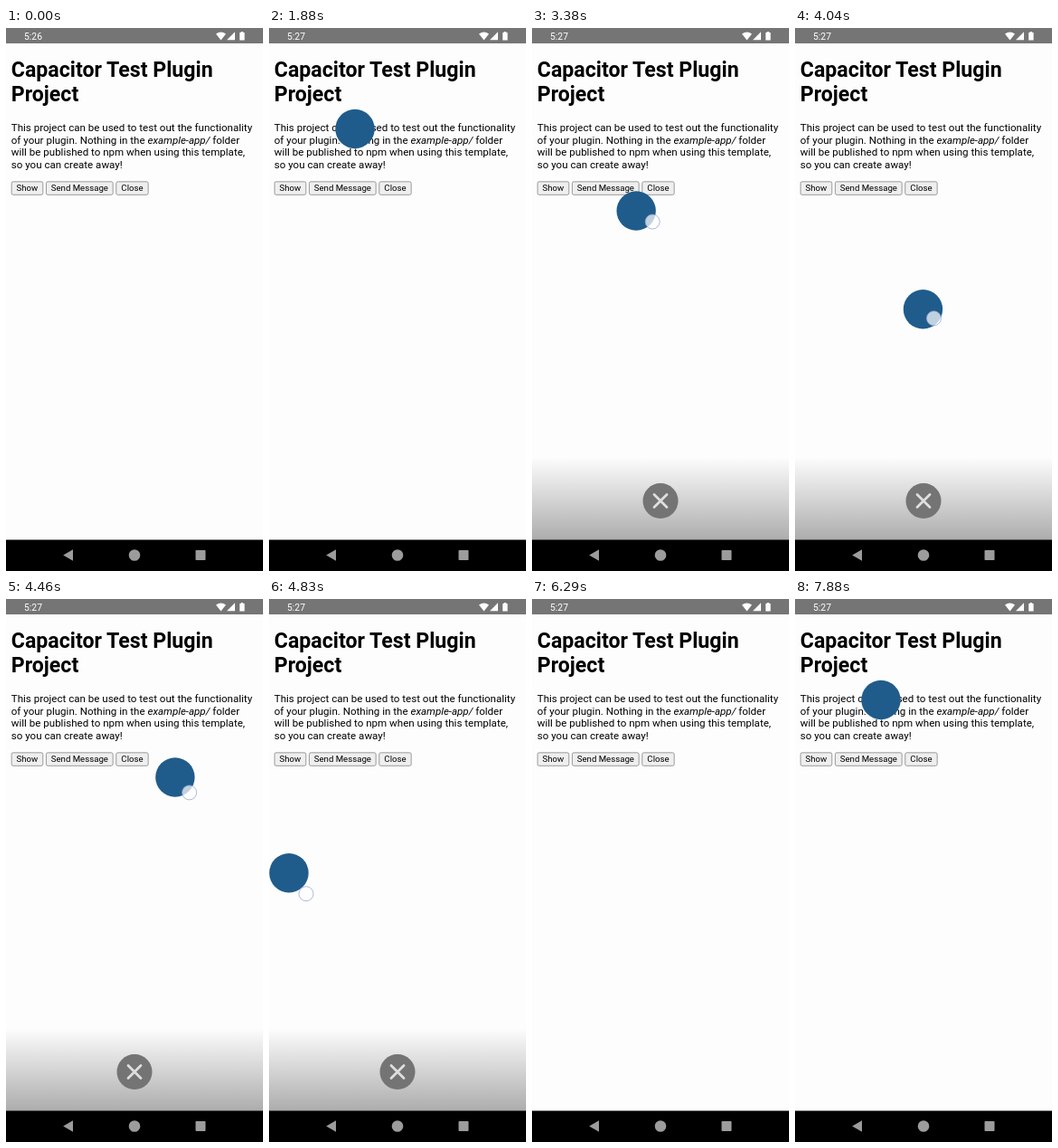
Write an HTML page that moves like this. It is 284 px wide and 600 px high and loops after 8000 ms.

```html
<!DOCTYPE html>
<html lang="en">
<head>
<meta charset="utf-8">
<title>Plugin demo</title>
<style>
html, body { margin: 0; width: 100%; height: 100%; overflow: hidden; background: #fdfdfd; }
#stage { position: relative; width: 284px; height: 600px; overflow: hidden; background: #fdfdfd; font-family: Roboto, sans-serif; }
#page {
  position: absolute; left: 0; top: 17px; width: 377px; padding: 0 8px;
  font-size: 16px; line-height: 19px; color: #000; white-space: nowrap;
  transform: scale(.7226); transform-origin: 0 0;
}
h1 { margin: 21.44px 0; font-size: 32px; line-height: 38px; font-weight: 700; }
p { margin: 0 0 16px; }
button {
  margin: 0; padding: 2px 7px; height: 21px; box-sizing: border-box;
  border: 1px solid #767676; border-radius: 3px; background: #efefef;
  font: 13.333px/15px Roboto, sans-serif; color: #000;
}
button.down { background: #f5f5f5; border-color: #8d8d8d; }
svg { position: absolute; left: 0; top: 0; }
svg text { font: 10.4px Roboto, sans-serif; fill: #fff; }
</style>
</head>
<body>
<div id="stage">
  <div id="page">
    <h1>Capacitor Test Plugin<br>Project</h1>
    <p>This project can be used to test out the functionality<br>of your plugin. Nothing in the <em>example-app/</em> folder<br>will be published to npm when using this template,<br>so you can create away!</p>
    <button id="show">Show</button> <button>Send Message</button> <button>Close</button>
  </div>
  <svg width="284" height="600" viewBox="0 0 284 600">
    <defs>
      <linearGradient id="fade" x1="0" y1="0" x2="0" y2="1">
        <stop offset="0" stop-color="#000" stop-opacity="0"/>
        <stop offset="1" stop-color="#000" stop-opacity=".32"/>
      </linearGradient>
    </defs>
    <rect id="shade" y="474" width="284" height="92" fill="url(#fade)"/>
    <g id="target">
      <circle r="19.5" fill="#747474"/>
      <path d="M-7-7L7 7M7-7L-7 7" stroke="#dedede" stroke-width="2.8" stroke-linecap="round"/>
    </g>
    <circle id="bubble" r="21.7" fill="#1f5c8b"/>
    <circle id="touch" r="8" fill="#fff" fill-opacity=".72" stroke="#8fa3cf" stroke-opacity=".75"/>

    <rect width="284" height="17" fill="#757575"/>
    <text id="clock" x="20" y="13.2">5:26</text>
    <g fill="#fff">
      <path d="M232 6.6Q237.5 2.6 243 6.6L237.5 13.4Z"/>
      <path d="M244 13.2L253 4.2V13.2Z"/>
      <path d="M258.2 5h1.5v-1h2.4v1h1.5v8.6h-5.4z"/>
    </g>
    <rect y="565.5" width="284" height="34.5"/>
    <g fill="#9c9c9c">
      <path d="M63.2 582.5L74 576.2V588.8Z"/>
      <circle cx="142" cy="582.5" r="6.3"/>
      <rect x="209.5" y="577" width="11" height="11" rx=".8"/>
    </g>
  </svg>
</div>
<script>
const LOOP = 8000, HOME = [95, 111.5], BIN = [142, 522.5];
const GRAB = 2830, DROP = 6090;

// time, x, y of the bubble while dragged
const path = [
  [2830, ...HOME], [2980, ...HOME], [3180, 105, 150], [3380, 115, 202],
  [3560, 160, 172], [3700, 222, 155], [3820, 245, 230], [3940, 196, 332],
  [4040, 142, 311], [4180, 62, 285], [4260, 44, 225], [4350, 85, 150],
  [4440, 170, 185], [4520, 219, 240], [4610, 190, 330], [4710, 95, 368],
  [4830, 22, 303], [4920, 22, 303], [5050, 60, 235], [5180, 125, 212],
  [5300, 190, 225], [5400, 205, 180], [5490, 150, 132], [5600, 65, 160],
  [5710, 38, 260], [5830, 88, 400], [5950, ...BIN], [6090, ...BIN]
];
// time, finger offset from the bubble centre
const finger = [
  [2830, 10, 9], [3380, 18, 12], [4040, 12, 10], [4830, 19, 23],
  [4920, 19, 23], [5300, 13, 11], [6130, 8, 25]
];

const el = id => document.getElementById(id);
const clamp = (v, a, b) => Math.min(b, Math.max(a, v));
const ramp = (t, a, b) => clamp((t - a) / (b - a), 0, 1);
const easeOut = u => 1 - (1 - u) ** 3;

function segment(keys, t) {
  let i = 0;
  while (i < keys.length - 2 && t >= keys[i + 1][0]) i++;
  return i;
}

function linear(keys, t) {
  const i = segment(keys, t), a = keys[i], b = keys[i + 1], u = ramp(t, a[0], b[0]);
  return [1, 2].map(k => a[k] + (b[k] - a[k]) * u);
}

// Hermite curve through timed points
function smooth(keys, t) {
  const i = segment(keys, t), a = keys[i], b = keys[i + 1];
  const prev = keys[i - 1] || a, next = keys[i + 2] || b;
  const d = b[0] - a[0], u = ramp(t, a[0], b[0]), v = 1 - u;
  return [1, 2].map(k => {
    const m = (b[k] - prev[k]) / (b[0] - prev[0]) * d;
    const n = (next[k] - a[k]) / (next[0] - a[0]) * d;
    return a[k] * (1 + 2 * u) * v * v + m * u * v * v + b[k] * u * u * (3 - 2 * u) - n * u * u * v;
  });
}

function place(id, [x, y], scale, alpha) {
  el(id).setAttribute("transform", `translate(${x} ${y}) scale(${scale})`);
  el(id).setAttribute("opacity", alpha);
}

function draw(t) {
  el("clock").textContent = t < 290 ? "5:26" : "5:27";

  const second = t >= 7000, press = second ? 7580 : 1290;
  const pressed = t >= press && t < press + 110;
  el("show").className = pressed ? "down" : "";

  const pop = easeOut(ramp(t, press + 110, press + 290));
  const out = ramp(t, DROP, 6280);
  let [x, y] = second ? HOME : smooth(path, t);
  x = clamp(x, 22, 262);
  y = clamp(y, HOME[1], BIN[1]);
  const gone = second ? 0 : out;
  place("bubble", [x, y + 10 * gone], (.4 + .6 * pop) * (1 - .6 * gone), pop * (1 - gone));

  const open = easeOut(ramp(t, 2990, 3190));
  el("shade").setAttribute("opacity", open * (1 - ramp(t, 6050, 6130)));
  place("target", [BIN[0], BIN[1] + 40 * (1 - open) + 12 * out], 1 - .4 * out, open * (1 - out));

  const dragging = t >= GRAB && t < DROP + 60;
  const [dx, dy] = linear(finger, t);
  place("touch", pressed ? [24, 178.5] : [x + dx, y + dy], 1, pressed || dragging ? 1 : 0);
}

const start = performance.now();
function tick() {
  draw((performance.now() - start) % LOOP);
  requestAnimationFrame(tick);
}
tick();
</script>
</body>
</html>
```
